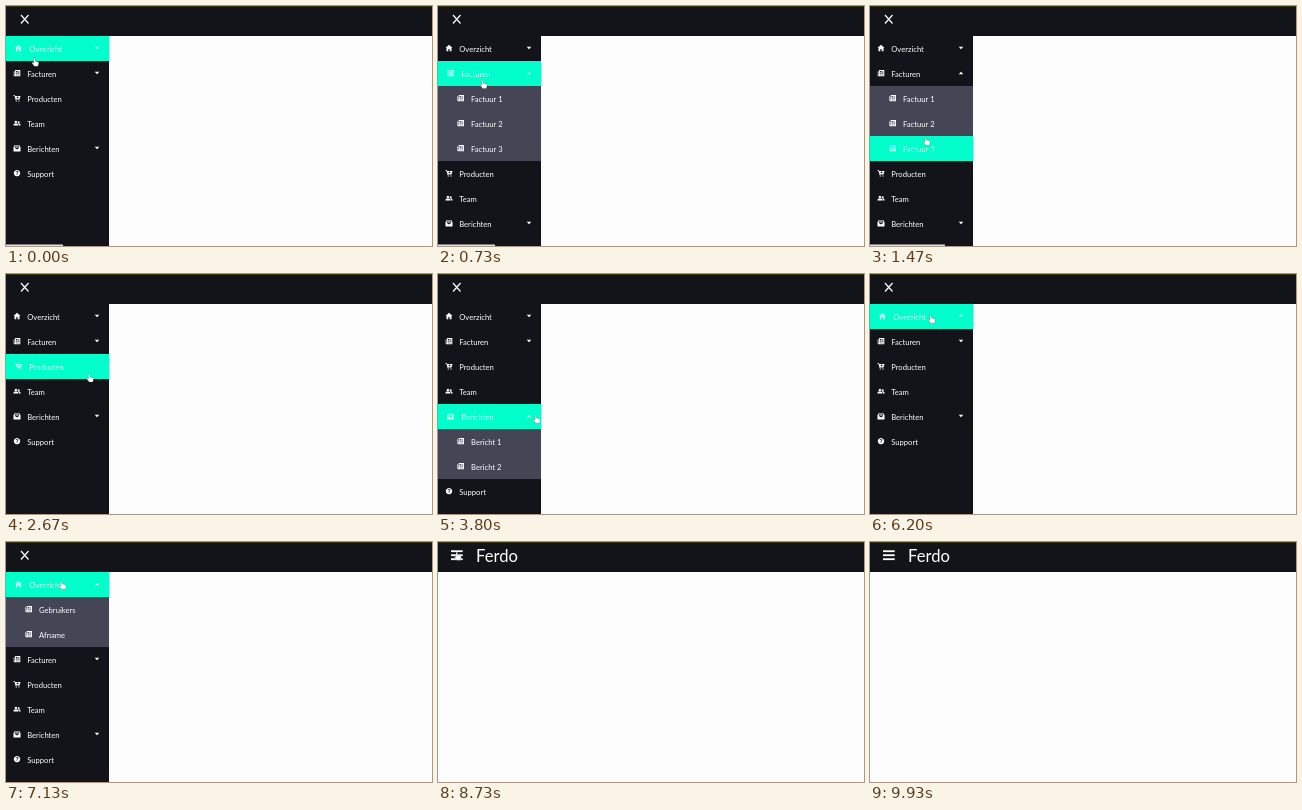
Recreate the animation shown at these times as an HTML page with a canvas. Size 426 by 240 pixels, loop 9990 ms.

```html
<!DOCTYPE html>
<html lang="nl">
<head>
<meta charset="utf-8">
<title>Menu</title>
<style>
  html, body { margin: 0; width: 100%; height: 100%; overflow: hidden; background: #fdfdfd; }
  canvas { display: block; width: 100vw; height: 100vh; }
</style>
</head>
<body>
<canvas></canvas>
<script>
const W = 426, H = 240, LOOP = 9990;
const SIDE = 103, TOP = 30, ROW = 25;
const DARK = '#12141a', SUB = '#444555', HOVER = '#02ffcb', PAGE = '#fdfdfd';

const canvas = document.querySelector('canvas');
const ctx = canvas.getContext('2d');
const scale = window.devicePixelRatio || 1;
canvas.width = W * scale;
canvas.height = H * scale;

// Icons live in a 7 x 7 box and are filled with the even-odd rule.
const ICONS = {
  home: 'M3.5 0L7 3.3H6V6.5H4.2V4.2H2.8V6.5H1V3.3H0Z',
  bill: 'M1.5 .4H6.8V6.5H.9Q.2 6.5 .2 5.7V1.5H1V5.6H1.5ZM2.3 1.3V2.9H3.9V1.3ZM4.5 1.5V2H6V1.5ZM4.5 2.6V3.1H6V2.6ZM2.3 3.8V4.3H6V3.8ZM2.3 5V5.5H6V5Z',
  cart: 'M0 .3H1.4L1.7 1.2H7L6.2 4.2H2.5L2.7 4.8H6V5.4H2.1L1 1H0ZM3.8 1.7V2.4H3.1V3H3.8V3.7H4.5V3H5.2V2.4H4.5V1.7ZM2.2 5.7H3.4V6.8H2.2ZM4.9 5.7H6.1V6.8H4.9Z',
  team: 'M2.4 1A1.25 1.25 0 1 1 2.39 1ZM0 5.8V5Q.2 3.9 1.5 3.9H3.3Q4.6 3.9 4.7 5V5.8ZM5.2 1.5A1 1 0 1 1 5.19 1.5ZM5.2 5.8V4.9Q5.1 4.3 4.7 3.9H5.7Q6.9 3.9 7 5V5.8Z',
  mail: 'M0 2.4L1 1.6V.2H6V1.6L7 2.4V6.8H0ZM1.7 .9V3.5L3.5 4.8L5.3 3.5V.9ZM2.3 1.5H4.7V2H2.3ZM2.3 2.6H4.7V3.1H2.3Z',
  help: 'M3.5 .2A3.2 3.2 0 1 1 3.49 .2ZM2.2 2.4H2.9Q3 1.8 3.5 1.8Q4.1 1.8 4.1 2.3Q4.1 2.6 3.6 2.9Q3.1 3.2 3.1 4H3.8Q3.8 3.5 4.3 3.2Q4.9 2.8 4.9 2.3Q4.8 1.2 3.5 1.2Q2.3 1.2 2.2 2.4ZM3.1 4.6V5.3H3.9V4.6Z'
};
for (const key in ICONS) ICONS[key] = new Path2D(ICONS[key]);
const HAND = new Path2D('M0 .6Q.8 -.3 1.5 .6V3L4.6 3.7Q5.4 4 5.2 5L4.6 8.2H.8L-1.7 5Q-1.5 4 -.7 4.4L0 5Z');

// "open" holds the times at which each submenu opens and closes.
const MENU = [
  { label: 'Overzicht', icon: 'home', subs: ['Gebruikers', 'Afname'], open: [6350, 7250] },
  { label: 'Facturen', icon: 'bill', subs: ['Factuur 1', 'Factuur 2', 'Factuur 3'], open: [430, 2250] },
  { label: 'Producten', icon: 'cart' },
  { label: 'Team', icon: 'team' },
  { label: 'Berichten', icon: 'mail', subs: ['Bericht 1', 'Bericht 2'], open: [3180, 4900] },
  { label: 'Support', icon: 'help' }
];

// Fingertip: time, x, y
const PATH = [
  [0, 27.5, 52], [270, 38, 64], [600, 42, 66], [950, 48, 92], [1470, 55, 131],
  [1700, 56, 136], [2130, 70, 66], [2400, 72, 67], [2980, 95, 140], [3800, 97, 141],
  [4100, 78, 164], [4400, 66, 187], [4750, 88, 145], [5270, 92, 147], [5500, 88, 141],
  [6150, 60, 41], [7130, 55, 39], [7400, 54, 39], [7850, 18, 10], [8950, 18, 10], [9250, 24, -12]
];
const SHUT = 8100, SLIDE = 300, FOLD = 280;

const clamp = v => Math.max(0, Math.min(1, v));
const ease = v => v * v * (3 - 2 * v);
const ramp = (t, start, length) => ease(clamp((t - start) / length));

function cursorAt(t) {
  let i = 0;
  while (i < PATH.length - 2 && t >= PATH[i + 1][0]) i++;
  const [t0, x0, y0] = PATH[i], [t1, x1, y1] = PATH[i + 1];
  const k = ramp(t, t0, t1 - t0);
  return { x: x0 + (x1 - x0) * k, y: y0 + (y1 - y0) * k };
}

function box(x, y, w, h, color) {
  ctx.fillStyle = color;
  ctx.fillRect(x, y, w, h);
}

function text(label, x, y, size, color) {
  ctx.font = `${size}px Lato, sans-serif`;
  ctx.fillStyle = color;
  ctx.fillText(label, x, y);
}

function shape(path, x, y, color) {
  ctx.save();
  ctx.translate(x, y);
  ctx.fillStyle = color;
  ctx.fill(path, 'evenodd');
  ctx.restore();
}

function caret(y, up, color) {
  const d = up ? -1.2 : 1.2;
  ctx.beginPath();
  ctx.moveTo(88.7, y - d);
  ctx.lineTo(93.3, y - d);
  ctx.lineTo(91, y + d);
  ctx.fillStyle = color;
  ctx.fill();
}

function drawRow(label, icon, y, sub, mouse) {
  const over = mouse.x < SIDE && mouse.y >= y && mouse.y < y + ROW;
  const color = over ? 'rgba(255,255,255,.72)' : '#fff';
  const shift = over && !sub ? 2 : 0;
  if (over) box(0, y, SIDE, ROW, HOVER);
  shape(ICONS[icon], (sub ? 19.2 : 7.5) + shift * .7, y + 8.7, color);
  text(label, (sub ? 33 : 21.2) + shift, y + 15.5, 7.65, color);
  return color;
}

function drawSidebar(t, mouse) {
  const out = ramp(t, SHUT, SLIDE);
  if (out >= 1) return;
  ctx.save();
  ctx.beginPath();
  ctx.rect(0, TOP, SIDE, H - TOP);
  ctx.clip();
  ctx.translate(-SIDE * out, 0);
  box(0, TOP, SIDE, H - TOP, DARK);
  let y = TOP;
  for (const { label, icon, subs, open } of MENU) {
    const color = drawRow(label, icon, y, false, mouse);
    if (subs) caret(y + 12, t >= open[0] && t < open[1], color);
    y += ROW;
    if (!subs) continue;
    const fold = ramp(t, open[0], FOLD) - ramp(t, open[1], FOLD);
    const height = subs.length * ROW * fold;
    if (height <= 0) continue;
    ctx.save();
    ctx.beginPath();
    ctx.rect(0, y, SIDE, height);
    ctx.clip();
    box(0, y, SIDE, height, SUB);
    const inside = mouse.y < y + height ? mouse : { x: W, y: 0 };
    subs.forEach((name, i) => drawRow(name, 'bill', y + i * ROW, true, inside));
    ctx.restore();
    y += height;
  }
  ctx.restore();
}

function drawHeader(t) {
  box(0, 0, W, TOP, DARK);
  box(0, 0, W, 1, '#34340f');
  if (t < SHUT) {
    ctx.beginPath();
    ctx.moveTo(15, 9);
    ctx.lineTo(22.5, 17.5);
    ctx.moveTo(22.5, 9);
    ctx.lineTo(15, 17.5);
    ctx.strokeStyle = '#fff';
    ctx.lineWidth = 1.2;
    ctx.stroke();
  } else {
    for (const y of [8.3, 12.3, 16.3]) box(13, y, 11.7, 1.8, '#fff');
    text('Ferdo', 38, 19.8, 16.6, '#fff');
  }
}

function draw(t) {
  const mouse = cursorAt(t);
  ctx.setTransform(scale, 0, 0, scale, 0, 0);
  box(0, 0, W, H, PAGE);
  drawHeader(t);
  drawSidebar(t, mouse);
  if (t < 1900) box(0, 238.5, t < 800 ? 57 : 75, 1.5, '#dfe2e6');
  if (mouse.y > -10) {
    shape(HAND, mouse.x, mouse.y, '#fff');
    ctx.save();
    ctx.translate(mouse.x, mouse.y);
    ctx.strokeStyle = 'rgba(20,30,35,.55)';
    ctx.lineWidth = .4;
    ctx.stroke(HAND);
    ctx.restore();
  }
}

const start = performance.now();
function tick() {
  draw((performance.now() - start) % LOOP);
  requestAnimationFrame(tick);
}
tick();
</script>
</body>
</html>
```
